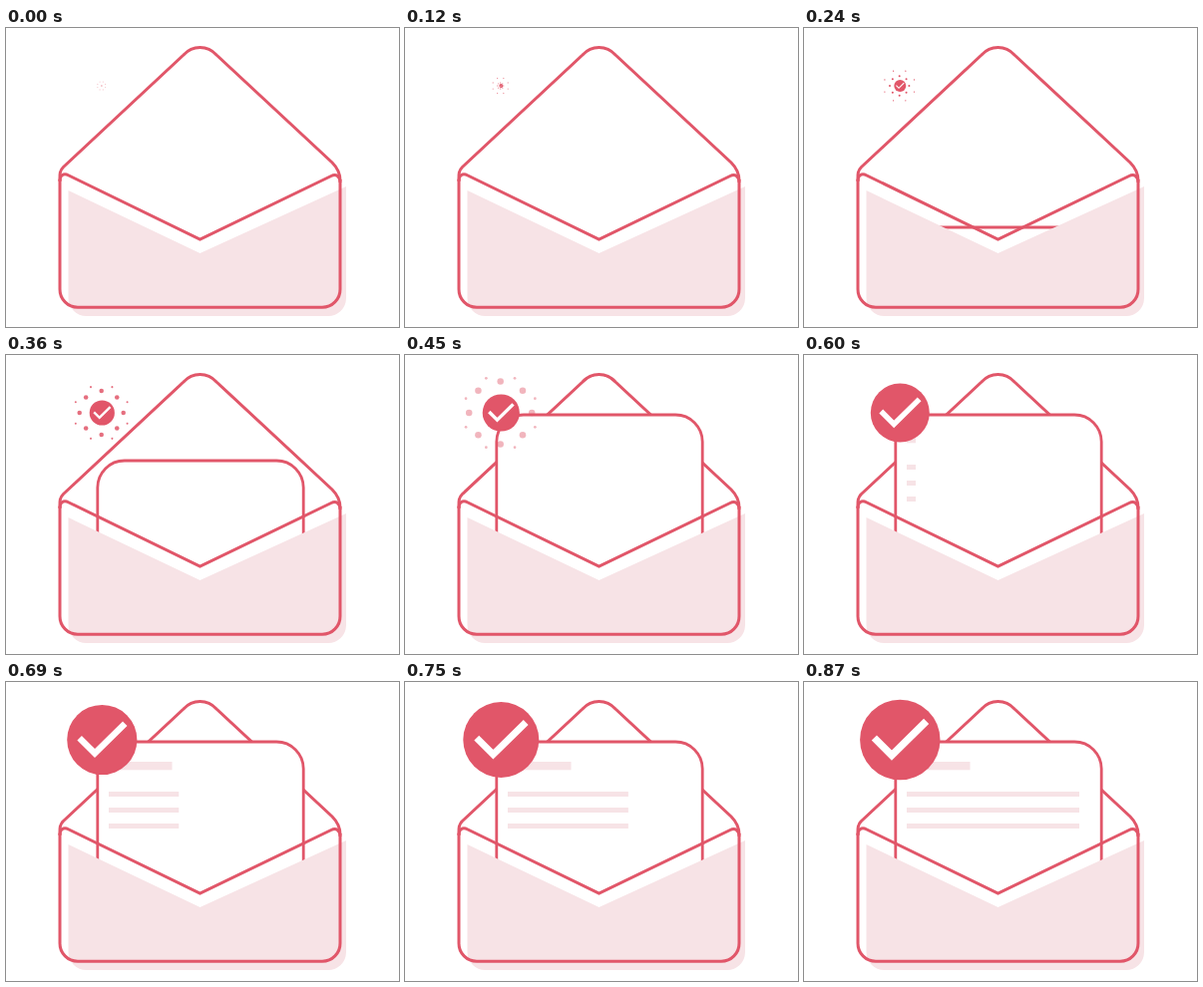
An HTML page that plays this animation: 394x300 px, repeating every 1.32 s.

```html
<!DOCTYPE html>
<html lang="en">
<head>
<meta charset="utf-8">
<title>Envelope</title>
<style>
  html, body { margin: 0; width: 100%; height: 100%; overflow: hidden; background: #fff; }
  svg { display: block; width: 100%; height: 100%; }
  .line { fill: none; stroke: #e15669; stroke-width: 3; }
  .red { fill: #e15669; }
  .pale { fill: #f7e3e6; }
</style>
</head>
<body>
<svg viewBox="0 0 394 300">
  <defs>
    <clipPath id="above"><rect width="394" height="262"/></clipPath>
    <clipPath id="wipe"><rect id="wipeBox" x="103" y="70" width="0" height="90"/></clipPath>
  </defs>

  <path class="line" d="M54 153C54 147 53.5 143.5 57.5 139.5L178 27C187 17 202 17 211 27L327 135C332 140 335 146 335 153"/>

  <g clip-path="url(#above)">
    <rect id="letter" class="line" style="fill:#fff;stroke-width:2.8" x="91.8" width="206.4" height="300" rx="27"/>
  </g>
  <g class="pale" clip-path="url(#wipe)">
    <rect x="103" y="80" width="63.5" height="8.3"/>
    <rect x="103" y="110" width="173" height="5"/>
    <rect x="103" y="126" width="173" height="5"/>
    <rect x="103" y="142" width="173" height="5"/>
  </g>

  <path class="pale" d="M62.5 163L194.5 226L341 159V271A18 18 0 0 1 323 289H80.500A18 18 0 0 1 62.500 271Z"/>
  <path class="line" d="M54 152V262A18 18 0 0 0 72 280.300H317A18 18 0 0 0 335 262V152"/>
  <path class="line" d="M54 154C54 147 58 145.500 63 148L194.500 212L326 148.500C331 146 335 149 335 155"/>

  <g id="dots" class="red"></g>
  <g id="badge">
    <circle class="red" r="40"/>
    <path d="M-25.800 -2L-8.300 15.500L26.200 -18.500" fill="none" stroke="#fff" stroke-width="7.300"/>
  </g>
</svg>
<script>
const LOOP = 1320, STEP = 30, END = 870;
const $ = id => document.getElementById(id);

// Smooth curve through [time, value] points, flat at both ends.
function curve(pts) {
  const slope = i => i === 0 || i === pts.length - 1 ? 0 :
    (pts[i + 1][1] - pts[i - 1][1]) / (pts[i + 1][0] - pts[i - 1][0]);
  return t => {
    if (t <= pts[0][0]) return pts[0][1];
    for (let i = 0; i < pts.length - 1; i++) {
      const [t0, a] = pts[i], [t1, b] = pts[i + 1];
      if (t > t1) continue;
      const h = t1 - t0, u = (t - t0) / h, v = 1 - u;
      return v * v * (1 + 2 * u) * a + u * u * (1 + 2 * v) * b +
        h * u * v * (v * slope(i) - u * slope(i + 1));
    }
    return pts[pts.length - 1][1];
  };
}

const letterY = curve([[180, 232], [240, 200], [360, 106], [450, 60]]);
const badgeR = curve([[0, 0], [240, 6], [360, 12.6], [450, 18.6], [600, 29.5], [750, 38], [870, 40.2]]);
const innerR = curve([[0, 0], [240, 9.7], [360, 22], [450, 31.5], [540, 36]]);
const outerR = curve([[0, 4.2], [240, 16], [360, 28], [450, 37.5], [540, 42]]);
const dotFade = curve([[0, 0.3], [240, 1], [360, 0.85], [450, 0.43], [540, 0]]);
const wipeW = t => {
  const p = Math.min(1, Math.max(0, (t - 558) / 302));
  return 173 * p * p * (3 - 2 * p);
};

const dots = Array.from({ length: 16 }, () =>
  $('dots').appendChild(document.createElementNS('http://www.w3.org/2000/svg', 'circle')));

function draw(t) {
  $('letter').setAttribute('y', letterY(t));
  $('wipeBox').setAttribute('width', wipeW(t));
  $('badge').setAttribute('transform', `translate(96.3 58) scale(${badgeR(t) / 40})`);
  $('dots').setAttribute('opacity', dotFade(t));
  dots.forEach((dot, i) => {
    const outer = i % 2, r = outer ? outerR(t) : innerR(t), a = i * Math.PI / 8;
    dot.setAttribute('cx', 95.7 + r * Math.cos(a));
    dot.setAttribute('cy', 58 + r * Math.sin(a));
    dot.setAttribute('r', Math.max(0.65, r * (outer ? 0.036 : 0.104)));
  });
}

function tick() {
  const t = performance.now() % LOOP;
  draw(Math.min(END, Math.floor(t / STEP) * STEP));
  requestAnimationFrame(tick);
}
tick();
</script>
</body>
</html>
```
